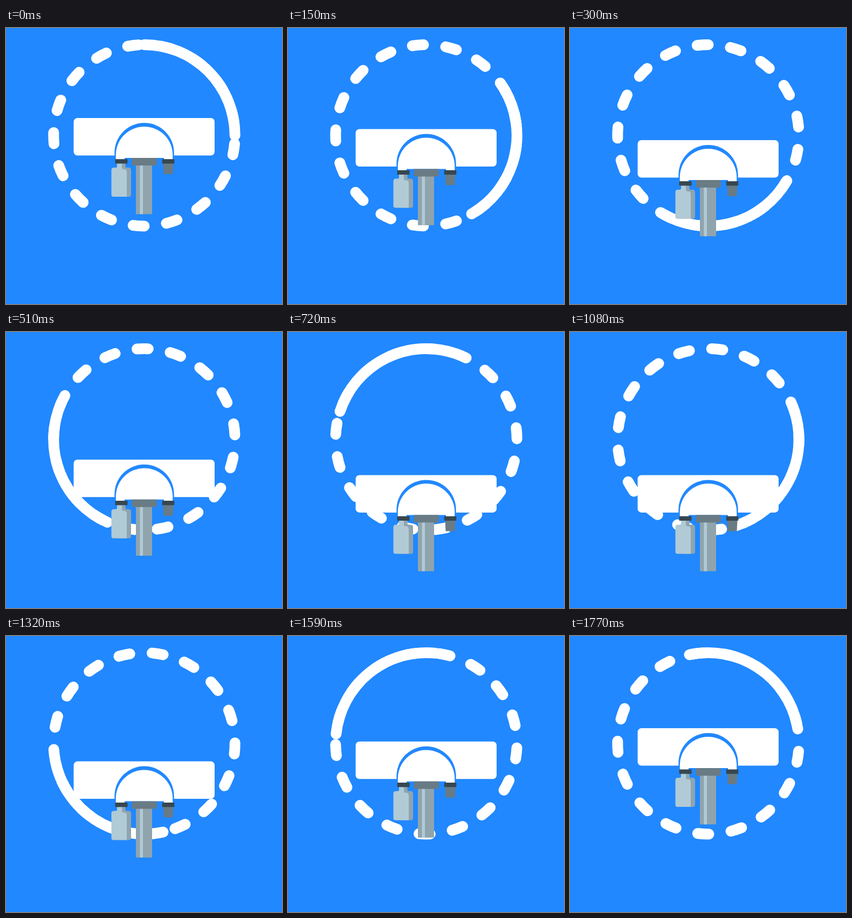
Recreate the animation shown at these times as an HTML page. Size 512x512 px, loop 1800 ms.

```html
<!DOCTYPE html>
<html lang="en">
<head>
<meta charset="utf-8">
<title>Loader</title>
<style>
  html, body { margin: 0; width: 100%; height: 100%; overflow: hidden; background: #2188ff; }
  svg { display: block; width: 100vw; height: 100vh; }
  .ring circle { fill: none; stroke: #fff; stroke-width: 20; stroke-linecap: round; }
  .bg { fill: #2188ff; }
  .white { fill: #fff; }
  .light { fill: #b0cad6; }
  .mid { fill: #90a4ae; }
  .steel { fill: #697b84; }
  .dark { fill: #37474f; }
</style>
</head>
<body>
<svg viewBox="0 0 512 512">
  <g class="ring" transform="translate(256.5 199.2) rotate(-90)">
    <circle id="dashes" r="168.2" pathLength="51" stroke-dasharray="1 2"/>
    <circle id="arc" r="168.2" pathLength="360" stroke-dasharray="90 270"/>
  </g>
  <g id="device">
    <rect class="white" x="125.5" y="167" width="261.5" height="69.5" rx="7"/>
    <path class="bg" d="M201.3 243V231.2a55.2 55.2 0 0 1 110.4 0V243z"/>
    <path class="white" d="M203.8 244V235.6a52.7 52.7 0 0 1 105.4 0V244H293V241H220V244z"/>

    <!-- pole -->
    <rect class="mid" x="241" y="254" width="30" height="91.3"/>
    <rect class="light" x="248.5" y="254" width="5.5" height="91.3"/>
    <rect class="steel" x="233.5" y="241" width="46.3" height="14"/>

    <!-- bottle -->
    <path class="mid" d="M210 250H221.5V256.5Q221.5 259 224 259H227.5Q232 259 232 263.5V309Q232 313 228 313H210z"/>
    <path class="light" d="M206 250H215V259Q215 262 218.5 262H220Q224 262.500 224 267V313H199.500Q195.500 313 195.500 309V263.500Q195.500 259 200 259H203.500Q206 259 206 256.500z"/>
    <rect class="dark" x="202.500" y="243.300" width="23" height="8.300" rx="1"/>

    <!-- nozzle -->
    <path class="steel" d="M291.500 251H310.500L309.500 271H292.500z"/>
    <rect class="dark" x="289.700" y="243.300" width="22.600" height="8.300" rx="1"/>
  </g>
</svg>
<script>
  const LOOP = 1800, STEP = 30, DROP = 123, PITCH = 360 / 17;
  const [dashes, arc, device] = ['dashes', 'arc', 'device'].map(id => document.getElementById(id));
  const start = performance.now();

  function draw(now) {
    const time = Math.floor(Math.max(0, now - start) % LOOP / STEP) * STEP;
    const p = time / LOOP;
    const drop = DROP * (1 - Math.abs(1 - 2 * p));
    dashes.setAttribute('transform', `rotate(${PITCH * (0.5 + p)})`);
    arc.setAttribute('transform', `rotate(${720 * p})`);
    device.setAttribute('transform', `translate(0 ${drop})`);
  }

  function tick(now) {
    draw(now);
    requestAnimationFrame(tick);
  }

  draw(start);
  requestAnimationFrame(tick);
</script>
</body>
</html>
```
